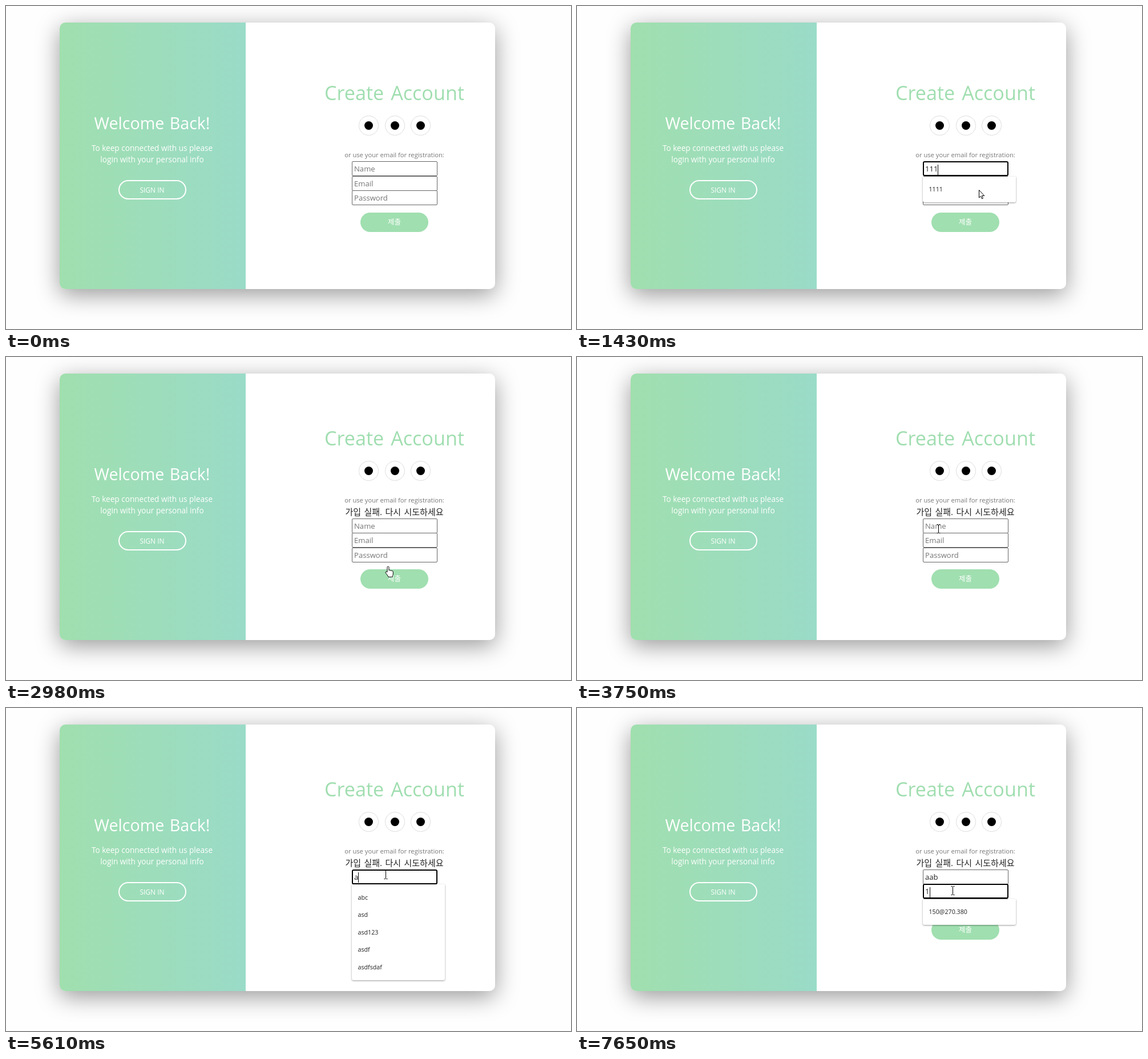
Write an HTML page that moves like this. It is 990 px wide and 566 px high and loops after 8 s.

```html
<!DOCTYPE html>
<html lang="ko">
<head>
<meta charset="utf-8">
<title>Sign up</title>
<style>
  html, body { margin: 0; width: 100%; height: 100%; overflow: hidden; background: #fefefe; }
  #stage { position: relative; width: 990px; height: 566px; overflow: hidden;
    font-family: "Open Sans", "Noto Sans CJK KR", "Noto Sans CJK", sans-serif; }
  #stage div, #stage svg { position: absolute; box-sizing: border-box; }
  .text { white-space: nowrap; text-align: center; height: 40px; line-height: 40px; }
  #card { left: 94px; top: 29px; width: 763px; height: 467px; border-radius: 10px;
    background: #fff; box-shadow: 0 10px 40px rgba(0,0,0,.4); }
  #side { left: 94px; top: 29px; width: 326px; height: 467px; color: #fff;
    border-radius: 10px 0 0 10px; background: linear-gradient(90deg, #a0dfae, #9adbc8); }
  #side .text { left: 0; width: 324px; }
  #upper, #lower { left: 0; top: 0; }
  #upper .text { left: 480px; width: 401px; }
  .social { top: 192px; width: 35px; height: 35px; border: 1px solid #ddd; border-radius: 50%; }
  .social::after { content: ""; position: absolute; left: 9px; top: 9px; width: 15px; height: 15px;
    border-radius: 50%; background: #000; }
  .pill { width: 119px; height: 34px; border-radius: 17px; text-align: center; line-height: 34px; }
  .field { left: 606px; width: 149.5px; height: 26px; padding-left: 3px; border: 1px solid #666;
    border-radius: 2px; background: #fff; color: #222; font-size: 13.1px; line-height: 25px;
    white-space: nowrap; }
  .field.empty { color: #757575; }
  .field.focus { border: 2px solid #000; border-radius: 3px; padding-left: 2px; line-height: 23px; z-index: 1; }
  .field.fill { background: #e8f0fe; }
  .field.preview { font-size: 11px; }
  .caret { display: inline-block; width: 1px; height: 18px; margin-right: -1px;
    vertical-align: middle; background: #000; }
  #menu { left: 606px; width: 163px; padding: 7.5px 0; background: #fff; z-index: 2;
    border-radius: 0 0 3px 3px; box-shadow: 0 1px 3px rgba(0,0,0,.4); }
  #menu p { margin: 0; height: 30.5px; line-height: 30.5px; padding-left: 10.5px;
    font-size: 10.7px; color: #222; }
  #menu p.hot { background: #c8c8c8; }
  #cursor { width: 18px; height: 22px; overflow: visible; z-index: 3; }
</style>
</head>
<body>
<div id="stage">
  <div id="card"></div>
  <div id="side">
    <div class="text" style="top:156px;font-size:28.6px;word-spacing:2px">Welcome Back!</div>
    <div class="text" style="top:200px;font-size:13.6px">To keep connected with us please</div>
    <div class="text" style="top:220px;font-size:13.6px">login with your personal info</div>
    <div class="pill" style="left:102.5px;top:275.5px;border:2px solid #fff;font-size:12px;line-height:31px">SIGN IN</div>
  </div>
  <div id="upper">
    <div class="text" style="top:132px;font-size:34.2px;word-spacing:3px;color:#a0deb0">Create Account</div>
    <div class="social" style="left:617.5px"></div>
    <div class="social" style="left:663.5px"></div>
    <div class="social" style="left:709px"></div>
    <div class="text" style="top:241px;font-size:11.2px;color:#777">or use your email for registration:</div>
    <div class="text" id="error" style="top:261px;font-size:15px;word-spacing:1.5px;color:#222">가입 실패. 다시 시도하세요</div>
  </div>
  <div id="lower">
    <div class="field" id="name" style="top:272px"></div>
    <div class="field" id="email" style="top:297.5px"></div>
    <div class="field" id="password" style="top:323px"></div>
    <div class="pill" style="left:621px;top:361.5px;background:#a0dfb0;color:#fff;font-size:12.5px">제출</div>
  </div>
  <div id="menu"></div>
  <svg id="cursor"><path id="shape" stroke="#000" stroke-linejoin="round"/></svg>
</div>
<script>
const LOOP = 8000, STEP = 75;
const $ = id => document.getElementById(id);

const ALL = ['123', 'abc', 'asd', '1111', 'sadfsdaf', '123456'];
const ONES = ['123', '1111', '123456', '123123'];
const LETTERS = ['abc', 'asd', 'asd123', 'asdf', 'asdfsdaf'];
const MAILS = ['150@270.380', 'asd@asd.asdf', '111@270.380'];
const HINTS = { name: 'Name', email: 'Email', password: 'Password' };

// [time, what changes in the form]
const EVENTS = [
  [0, { error: false, name: '', email: '', password: '', preview: '', focus: '',
        fill: false, list: [], hot: -1, caret: true }],
  [520, { focus: 'name', list: ALL }],
  [670, { hot: 0, preview: '123' }],
  [900, { hot: -1, preview: '', name: '1', list: [] }],
  [980, { list: ONES }],
  [1210, { name: '11', list: ['1111'] }],
  [1430, { name: '111' }],
  [1760, { hot: 0, preview: '1111' }],
  [1990, { hot: -1, preview: '', name: '1111', fill: true, list: [] }],
  [2370, { focus: '' }],
  [2520, { error: true, name: '', fill: false }],
  [3830, { focus: 'name', list: ALL }],
  [4380, { hot: 0, preview: '123' }],
  [4690, { hot: -1, preview: '' }],
  [5310, { caret: false }],
  [5610, { caret: true, name: 'a', list: LETTERS }],
  [5780, { name: 'aa', list: [] }],
  [5860, { name: 'aab' }],
  [6410, { caret: false }],
  [6780, { caret: true, focus: 'email', list: MAILS }],
  [7320, { caret: false }],
  [7650, { caret: true, email: '1', list: MAILS.slice(0, 1) }]
];

// [time, x, y, pointer]
const PATH = [
  [70, 924, 534, 'arrow'], [300, 790, 372, 'arrow'], [520, 694, 288, 'beam'],
  [595, 700, 305, 'arrow'], [670, 704, 322, 'arrow'], [1760, 704, 322, 'arrow'],
  [1990, 668, 318, 'arrow'], [2060, 668, 325, 'beam'], [2290, 684, 366, 'hand'],
  [2440, 688, 381, 'hand'], [2840, 688, 381, 'hand'], [2990, 650, 352, 'beam'],
  [3140, 585, 318, 'arrow'], [3300, 564, 292, 'arrow'], [3450, 592, 270, 'arrow'],
  [3600, 634, 298, 'beam'], [3680, 633, 301, 'beam'], [3905, 633, 301, 'beam'],
  [3980, 632, 303, 'beam'], [4230, 632, 303, 'beam'], [4305, 650, 314, 'arrow'],
  [4380, 668, 326, 'arrow'], [4530, 680, 330, 'arrow'], [4610, 680, 330, 'arrow'],
  [4690, 672, 308, 'beam'], [4760, 665, 292, 'beam'], [6560, 665, 292, 'beam'],
  [6780, 658, 320, 'beam']
];

// path, fill and hot spot of each pointer
const POINTERS = {
  arrow: ['M.5.5V14l3-2.8 2 4.6 2-.9-2-4.4h4.3z', '#fff', 0, 0],
  beam: ['M.5.5h2l1 1 1-1h2M3.5 1v14M.5 15.5h2l1-1 1 1h2', 'none', 3.5, 8],
  hand: ['M4 11V2.5a1.5 1.5 0 0 1 3 0V8a1.5 1.5 0 0 1 2.6.5 1.5 1.5 0 0 1 2.5.6 ' +
    '1.4 1.4 0 0 1 2.2 1.2V14c0 2-1 3-1.3 5.5H6C5.4 17 3 15 1.2 12.2c-.9-1.6 1-2.6 2-1.6z', '#fff', 5.5, 1]
};

function stateAt(t) {
  return Object.assign({}, ...EVENTS.filter(e => e[0] <= t).map(e => e[1]));
}

function drawField(id, s) {
  const el = $(id), focus = s.focus === id;
  const preview = focus ? s.preview : '';
  const value = preview || s[id];
  const caret = focus ? `<span class="caret" style="opacity:${+s.caret}"></span>` : '';
  const text = value || HINTS[id];
  el.className = 'field';
  el.classList.toggle('empty', !value);
  el.classList.toggle('focus', focus);
  el.classList.toggle('preview', !!preview);
  el.classList.toggle('fill', !!preview || (id === 'name' && s.fill));
  el.innerHTML = preview || !value ? caret + text : text + caret;
}

function drawForm(s) {
  $('upper').style.top = s.error ? '-10px' : 0;
  $('lower').style.top = s.error ? '10.5px' : 0;
  $('error').style.display = s.error ? '' : 'none';
  Object.keys(HINTS).forEach(id => drawField(id, s));
  const menu = $('menu');
  menu.style.display = s.list.length ? '' : 'none';
  menu.style.top = (s.error ? 309 : 298.5) + (s.focus === 'email' ? 25.5 : 0) + 'px';
  menu.innerHTML = s.list.map((item, i) =>
    `<p class="${i === s.hot ? 'hot' : ''}">${item}</p>`).join('');
}

function drawCursor(t) {
  const next = PATH.findIndex(k => k[0] > t);
  $('cursor').style.display = next === 0 ? 'none' : '';
  if (next === 0) return;
  const a = PATH[(next < 0 ? PATH.length : next) - 1];
  const b = next < 0 ? a : PATH[next];
  const f = b === a ? 0 : Math.floor((t - a[0]) / STEP) * STEP / (b[0] - a[0]);
  const [d, fill, hx, hy] = POINTERS[a[3]];
  $('shape').setAttribute('d', d);
  $('shape').setAttribute('fill', fill);
  $('cursor').style.left = Math.round(a[1] + (b[1] - a[1]) * f - hx) + 'px';
  $('cursor').style.top = Math.round(a[2] + (b[2] - a[2]) * f - hy) + 'px';
}

let shown = '';
function frame() {
  const t = performance.now() % LOOP;
  const s = stateAt(t), key = JSON.stringify(s);
  if (key !== shown) drawForm(s);
  shown = key;
  drawCursor(t);
  requestAnimationFrame(frame);
}
frame();
</script>
</body>
</html>
```
